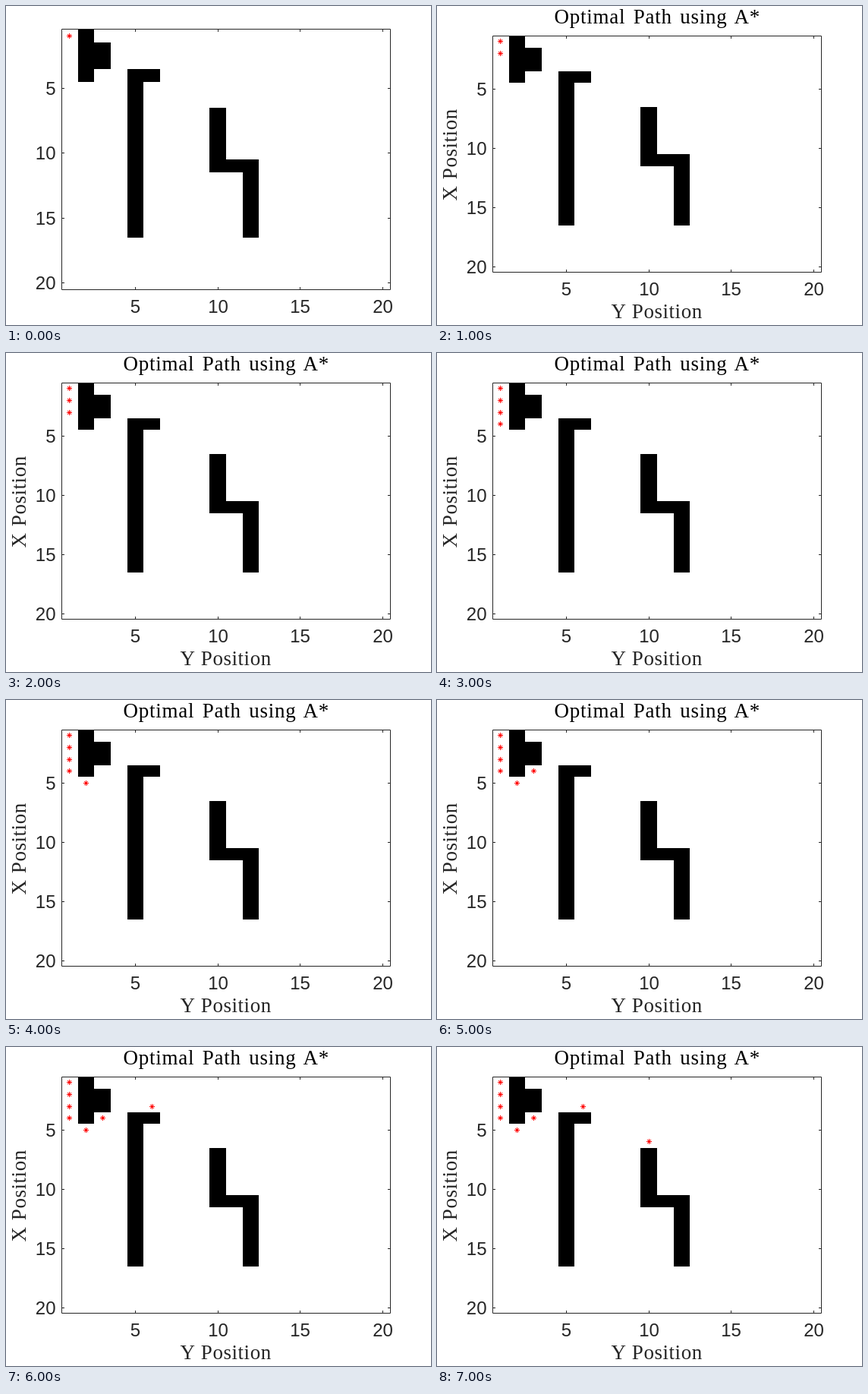
Write an HTML page that moves like this. It is 560x420 px and loops after 8000 ms.

```html
<!DOCTYPE html>
<html lang="en">
<head>
<meta charset="utf-8">
<title>Grid path search</title>
<style>
html, body { margin: 0; width: 100%; height: 100%; overflow: hidden; background: #fff; }
svg { display: block; width: 560px; height: 420px; }
.num { font: 24px "Liberation Sans", Arial, sans-serif; fill: #262626; }
.name { font: 27px "Liberation Serif", "Times New Roman", serif; fill: #262626; letter-spacing: .55px; word-spacing: 1px; }
.title { fill: #000; letter-spacing: .75px; word-spacing: 3px; }
.axis { fill: none; stroke: #262626; }
.star { fill: none; stroke: #f00; shape-rendering: crispEdges; }
</style>
</head>
<body>
<svg id="stage" viewBox="0 0 560 420"></svg>
<script>
const STEP = 1000, LOOP = 8000;
const LEFT = 73, CELL_W = 21.7, X0 = 73.5, X1 = 506.5, TICK = 3.5;
// Walls as [column, row, columns, rows]
const walls = [[2, 1, 1, 4], [3, 2, 1, 2], [5, 4, 1, 13], [6, 4, 1, 1],
  [10, 7, 1, 5], [11, 11, 1, 1], [12, 11, 1, 6]];
// Visited cells as [column, row], one more per step
const path = [[1, 1], [1, 2], [1, 3], [1, 4], [2, 5], [3, 4], [6, 3], [10, 6]];
const plain = { top: 31.2, cell: 17.1, y0: 30.5, y1: 373.5 };
const titled = { top: 39.05, cell: 15.6, y0: 39.5, y1: 350.5 };

const stage = document.getElementById("stage");

function add(parent, tag, attrs, text) {
  const el = document.createElementNS("http://www.w3.org/2000/svg", tag);
  for (const key in attrs) el.setAttribute(key, attrs[key]);
  if (text) el.textContent = text;
  parent.append(el);
  return el;
}

const edgeX = col => Math.round(LEFT - .2 + CELL_W * (col - 1));
const midX = col => Math.floor(LEFT + CELL_W * (col - .5)) + .5;
const midY = (plot, row) => Math.floor(plot.top + plot.cell * (row - .5)) + .5;

function drawPlot(plot) {
  const g = add(stage, "g", {});
  const edgeY = row => Math.round(plot.top + plot.cell * (row - 1));
  for (const [c, r, w, h] of walls) {
    const x = edgeX(c), y = edgeY(r);
    add(g, "rect", { x, y, width: edgeX(c + w) - x, height: edgeY(r + h) - y });
  }
  const { y0, y1 } = plot;
  let d = `M${X0} ${y0}H${X1}V${y1}H${X0}Z`;
  for (let n = 5; n <= 20; n += 5) {
    const x = midX(n), y = midY(plot, n);
    d += `M${x} ${y0}v${TICK}M${x} ${y1}v${-TICK}M${X0} ${y}h${TICK}M${X1} ${y}h${-TICK}`;
    add(g, "text", { class: "num", x, y: y1 + 30.5, "text-anchor": "middle" }, String(n));
    add(g, "text", { class: "num", x: 65.5, y: y + 8.5, "text-anchor": "end" }, String(n));
  }
  add(g, "path", { class: "axis", d });
  return g;
}

function drawStar(parent, plot, [col, row]) {
  return add(parent, "path", {
    class: "star",
    d: "M0-3.5v7M-3.5 0h7M-2.5-2.5l5 5M-2.5 2.5l5-5",
    transform: `translate(${midX(col)} ${midY(plot, row)})`
  });
}

const first = drawPlot(plain);
drawStar(first, plain, path[0]);

const rest = drawPlot(titled);
add(rest, "text", { class: "name title", x: 154.5, y: 22.5 }, "Optimal Path using A*");
add(rest, "text", { class: "name", x: 229.5, y: 411 }, "Y Position");
add(rest, "text", { class: "name", transform: "translate(26 256.5) rotate(-90)" }, "X Position");
const stars = path.map(cell => drawStar(rest, titled, cell));

function show(el, on) {
  el.setAttribute("display", on ? "inline" : "none");
}

function render(ms) {
  const step = Math.floor(ms % LOOP / STEP);
  show(first, step === 0);
  show(rest, step > 0);
  stars.forEach((star, i) => show(star, i <= step));
}

let start;
function tick(now) {
  if (start === undefined) start = now;
  render(now - start);
  requestAnimationFrame(tick);
}
render(0);
requestAnimationFrame(tick);
</script>
</body>
</html>
```
